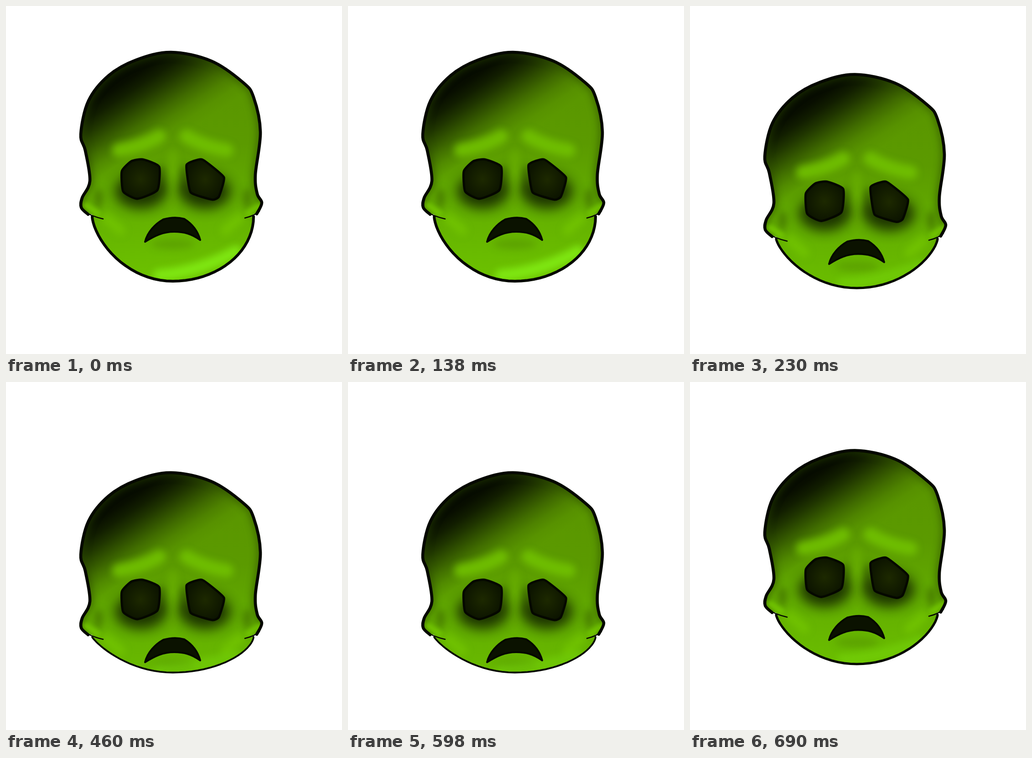
An HTML page for the animation above (920 ms loop, 737 by 760 pixels).

```html
<!DOCTYPE html>
<html lang="en">
<head>
<meta charset="utf-8">
<title>Nodding skull</title>
<style>
html, body { margin: 0; width: 100%; height: 100%; overflow: hidden; background: #fff; }
svg { display: block; width: 100vw; height: 100vh; }
.ink { fill: none; stroke: #050800; stroke-linecap: round; stroke-linejoin: round; }
</style>
</head>
<body>
<svg id="stage" viewBox="0 0 737 760"></svg>
<script>
const STEP = 230;
const ORDER = [0, 1, 2, 1];
const DROP = 48.5;   // head travel per pose
const MID = 366;     // axis of the face
const JAW = 460;     // height where the chin begins

// Each chin is a half oval; left and right set how pointed its sides are
const poses = [
  { depth: 141, left: 0.65, right: 0.5, width: 6, light: 0.9 },
  { depth: 107.5, left: 0.73, right: 0.68, width: 5.2, light: 0.3 },
  { depth: 77.5, left: 0.86, right: 0.62, width: 3.8, light: 0.3 }
];

function chinLine({ depth, left, right }) {
  const pts = [];
  for (let i = 0; i <= 40; i++) {
    const t = Math.PI * i / 40;
    const x = MID - 177 * Math.cos(t);
    const y = JAW + depth * Math.abs(Math.sin(t)) ** (2 * (i < 20 ? left : right));
    pts.push(`${x.toFixed(1)},${y.toFixed(1)}`);
  }
  return 'M' + pts.join('L');
}

// Smooth curve through key points
function curve(text, closed = false, k = 1 / 6) {
  const p = text.split(' ').map(s => s.split(',').map(Number)), n = p.length;
  const at = i => closed ? p[(i + n) % n] : p[Math.max(0, Math.min(n - 1, i))];
  let d = `M${p[0]}`;
  for (let i = 0; i < (closed ? n : n - 1); i++) {
    const [a, b, c, e] = [at(i - 1), at(i), at(i + 1), at(i + 2)];
    const c1 = b.map((v, j) => v + (c[j] - a[j]) * k);
    const c2 = c.map((v, j) => v - (e[j] - b[j]) * k);
    d += `C${c1} ${c2} ${c}`;
  }
  return d + (closed ? 'Z' : '');
}

const skull = curve('180,455 165,440 167,419 184,382 174,316 164,280 181,207 225,152 285,118 362,101 450,120 520,167 543,199 558,275 547,368 551,410 561,430 550,454');
const eyes = [
  curve('254,361 275,339 300,335 336,351 332,402 288,421 257,405', true, 0.09),
  curve('396,347 430,335 478,374 467,416 453,423 405,407', true, 0.07)
];
const mouth = 'M305,515C310,494 327,476 345,466Q370,459 391,465C407,475 420,489 426,511C406,497 390,493 369,493C344,493 326,502 305,515Z';

const path = (d, attrs = '') => `<path d="${d}" ${attrs}/>`;
const ink = (d, w) => path(d, `class="ink" stroke-width="${w}"`);
const blob = (x, y, rx, ry, fill, blur, opacity) =>
  `<ellipse cx="${x}" cy="${y}" rx="${rx}" ry="${ry}" fill="${fill}" opacity="${opacity}" filter="url(#b${blur})"/>`;
const glow = (d, color, w, blur, opacity) =>
  path(d, `fill="none" stroke="${color}" stroke-width="${w}" stroke-linecap="round" opacity="${opacity}" filter="url(#b${blur})"`);

const blurs = [4, 8, 14].map(s =>
  `<filter id="b${s}" filterUnits="userSpaceOnUse" x="0" y="0" width="737" height="760" color-interpolation-filters="sRGB">
    <feGaussianBlur stdDeviation="${s}"/></filter>`).join('');

const linear = (id, axis, stops) => {
  const [x1, y1, x2, y2] = axis;
  return `<linearGradient id="${id}" gradientUnits="userSpaceOnUse" x1="${x1}" y1="${y1}" x2="${x2}" y2="${y2}">${stops}</linearGradient>`;
};
const skin = ['#5a9500', '#5b9a00', '#64b000', '#6cc200']
  .map((c, i) => `<stop offset="${i / 3}" stop-color="${c}"/>`).join('');
// Shadow fades from the upper left along a cosine
const shadow = Array.from({ length: 9 }, (_, i) =>
  `<stop offset="${i / 8}" stop-color="#050900" stop-opacity="${(0.5 + 0.5 * Math.cos(Math.PI * i / 8)).toFixed(3)}"/>`).join('');

const box = fill => `<rect x="140" y="80" width="450" height="540" fill="url(#${fill})"/>`;

// Shading shared by both halves of the face
const half = side => {
  const x = v => MID + side * v;
  return glow(`M${x(30)},285Q${x(68)},307 ${x(118)},315`, '#70bf00', 30, 8, 0.95) +
    blob(x(71), 405, 56, 38, '#1a2e00', 14, 0.95) +
    blob(x(24), 380, 9, 34, '#223a00', 8, 0.5) +
    blob(x(163), 420, 10, 22, '#3a6400', 8, 0.6) +
    glow(`M${x(190)},436L${x(166)},453`, '#74c800', 14, 4, 0.85) +
    glow(`M${x(146)},464L${x(115)},490`, '#72c400', 22, 8, 0.85);
};

const shade = box('skin') + box('shadow') +
  glow(skull, '#2c4c00', 14, 8, 0.6) +
  glow(`M${MID},325V430`, '#68ae00', 20, 8, 0.8) +
  half(-1) + half(1) +
  blob(MID, 520, 48, 11, '#579800', 8, 0.65);

const features =
  eyes.map(d => path(d, 'fill="url(#hole)"') + ink(d, 5)).join('') +
  path(mouth, 'fill="#0b1200"') + ink(mouth, 4) + ink(skull, 6.6) +
  ink('M170,448Q187,459 213,465', 2.6) + ink('M556,448Q545,458 524,463', 2.6);

const face = (pose, i) => {
  const chin = chinLine(pose);
  const y = f => JAW + pose.depth * f;
  return `<clipPath id="c${i}">${path(skull + 'Z')}${path(chin + 'V440H189Z')}</clipPath>
    <g class="pose" opacity="${i ? 0 : 1}"><g transform="translate(0 ${DROP * i})">
      <g clip-path="url(#c${i})"><use href="#shade"/>
        ${glow(`M335,${y(0.91)}Q420,${y(0.86)} 505,${y(0.54)}`, '#82ec14', 25, 8, pose.light)}</g>
      ${ink(chin, pose.width)}<use href="#features"/>
    </g></g>`;
};

document.getElementById('stage').innerHTML = `<defs>${blurs}
  ${linear('skin', [0, 150, 0, 600], skin)}
  ${linear('shadow', [233, 156, 337, 315], shadow)}
  <radialGradient id="hole"><stop stop-color="#1d2900"/><stop offset="1" stop-color="#0d1500"/></radialGradient>
  <g id="shade">${shade}</g><g id="features">${features}</g></defs>` + poses.map(face).join('');

document.querySelectorAll('.pose').forEach((el, i) => {
  const frames = [...ORDER, ORDER[0]].map((p, k) => ({
    opacity: p === i ? 1 : 0,
    offset: k / ORDER.length,
    easing: 'step-end'
  }));
  const anim = el.animate(frames, { duration: STEP * ORDER.length, iterations: Infinity });
  anim.startTime = document.timeline.currentTime;
});
</script>
</body>
</html>
```
